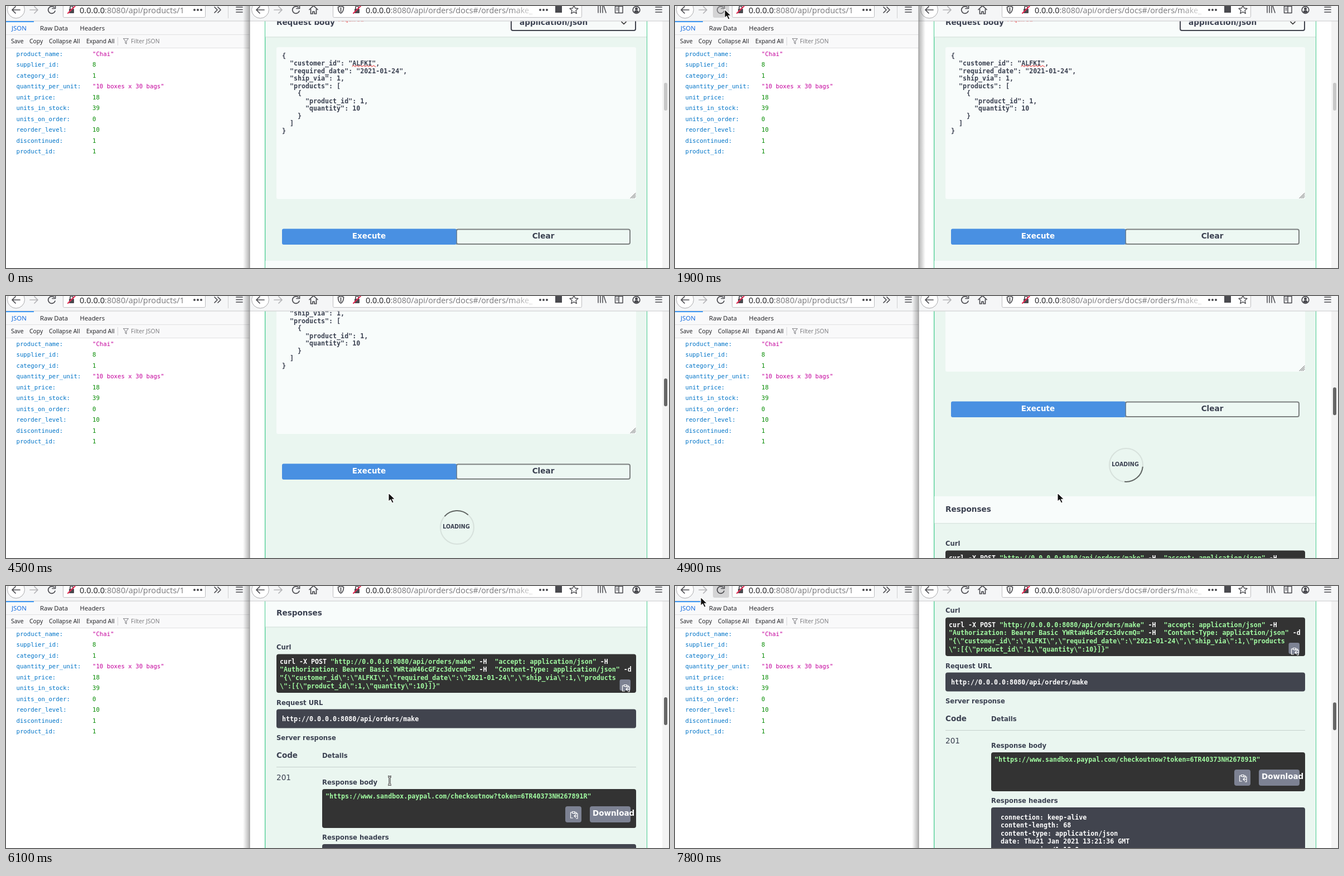
Write an HTML page that moves like this. It is 1189 px wide and 471 px high and loops after 8000 ms.

```html
<!DOCTYPE html>
<html lang="en">
<head>
<meta charset="utf-8">
<title>Order API demo</title>
<style>
html, body { margin: 0; width: 100%; height: 100%; overflow: hidden; background: #fff; }
svg { display: block; width: 1189px; height: 471px; }
text { white-space: pre; }
.ui { font-family: "Open Sans", "Noto Sans", sans-serif; fill: #1a1a1e; }
.page { font-family: "DejaVu Sans", sans-serif; font-weight: bold; fill: #3b4151; }
.mono { font-family: "DejaVu Sans Mono", monospace; }
.line { fill: none; stroke: #4a4a4f; stroke-width: 1.7; stroke-linecap: round; stroke-linejoin: round; }
</style>
</head>
<body>
<svg id="stage" viewBox="0 0 1189 471"></svg>
<script>
const LOOP = 8000, STEP = 100;
const GREEN = "#a2fca2", SLATE = "#41444e", MINT = "#eaf6f0", PALE = "#f8fcfb";

const esc = s => String(s).replace(/&/g, "&amp;").replace(/</g, "&lt;");
const rect = (x, y, w, h, fill, more = "") =>
  `<rect x="${x}" y="${y}" width="${w}" height="${h}" fill="${fill}" ${more}/>`;
const text = (x, y, size, str, cls, more = "") =>
  `<text x="${x}" y="${y}" font-size="${size}" class="${cls}" ${more}>${esc(str)}</text>`;
const page = (x, y, size, str, more) => text(x, y, size, str, "page", more);
const code = (x, y, str, fill, size = 11.65) =>
  text(x, y, size, str, "mono", `fill="${fill}" font-weight="bold"`);
const line = (d, more = "") => `<path class="line" d="${d}" ${more}/>`;
const group = (id, body, more = "") => `<g id="${id}" ${more}>${body}</g>`;

// Strings inside double quotes are green, the rest is white.
function curlLine(x, y, parts) {
  const spans = parts.map((p, i) => `<tspan fill="${i % 2 ? GREEN : "#fff"}">${esc(p)}</tspan>`);
  return `<text x="${x}" y="${y}" font-size="11.65" font-weight="bold" class="mono">${spans.join("")}</text>`;
}

const dots = x => [0, 6, 12].map(d => `<circle cx="${x + d}" cy="7" r="2" fill="#4a4a4f"/>`).join("");
const menu = x => line(`M${x} 2h11m-11 4.5h11m-11 4.5h11`, 'stroke-linecap="butt"');
const reload = (x, id) =>
  line(`M${x + 4} 2.2A6.3 6.3 0 1 0 ${x + 6} 9M${x + 6.5} -1V4.5H${x + 1}`, `id="${id}"`);
const lock = x => rect(x - 4, 5, 9, 8, "#4a4a4f", 'rx="1"') +
  line(`M${x - 2} 5V2a2.6 2.6 0 0 1 5 0V5`) +
  line(`M${x - 6} 13L${x + 7} 0`, 'style="stroke:#e22850;stroke-width:2"');
const clipboard = (x, y) =>
  line(`M${x - 3} ${y - 4}h-2.5v10h4m4-10h2.5v3M${x - 2.5} ${y - 5.5}h4.5v3h-4.5zM${x + 7} ${y + 2.5}h-6m2.5-2.5l-2.5 2.5l2.5 2.5m1 2h2.500v-9h-7`,
    'style="stroke:#fff;stroke-width:1.2"');

function navigation(x, id) {
  return `<circle cx="${x + 18}" cy="6.500" r="15.500" fill="#fff" stroke="#a9a9ac"/>` +
    line(`M${x + 25} 7H${x + 11}m6 -6l-6 6l6 6`) +
    line(`M${x + 43} 7h14m-6 -6l6 6l-6 6`, 'style="stroke:#b4b4b7"') +
    group(id + "Hover", rect(x + 68, -6, 29, 27, "#d4d4d5", 'rx="3"'), 'opacity="0"') +
    reload(x + 82, id + "Reload");
}
const address = (x, path, size) =>
  `<text x="${x}" y="12.500" font-size="${size}" class="ui">0.0.0.0<tspan fill="#77777a">:8080${path}</tspan></text>`;

function leftWindow() {
  const rows = [["product_name", '"Chai"'], ["supplier_id", 8], ["category_id", 1],
    ["quantity_per_unit", '"10 boxes x 30 bags"'], ["unit_price", 18], ["units_in_stock", 39],
    ["units_on_order", 0], ["reorder_level", 10], ["discontinued", 1], ["product_id", 1]];
  const tree = rows.map(([key, value], i) => {
    const y = 90 + i * 19.45;
    return text(18.500, y, 10.7, key + ":", "mono", 'fill="#0074c8"') +
      text(155, y, 10.7, value, "mono", `fill="${typeof value === "string" ? "#c4009c" : "#058b00"}"`);
  }).join("");
  const tabs = [[10, "JSON", "#0060df"], [61, "Raw Data"], [132.500, "Headers"]]
    .map(([x, s, c]) => text(x, 44, 11.4, s, "ui", c ? `style="fill:${c}"` : "")).join("");
  const tools = [[9, "Save"], [42, "Copy"], [77, "Collapse All"], [144, "Expand All"]]
    .map(([x, s]) => text(x, 67, 10.4, s, "ui")).join("");
  return rect(0, 0, 437, 471, "#fff") + rect(0, 0, 437, 27, "#f5f6f7") +
    navigation(0, "left") +
    rect(102.500, -10, 255, 30.500, "#fff", 'rx="2" stroke="#bcbcbf"') + lock(117) +
    address(132, "/api/products/1", 14.6) + dots(338) +
    line("M374 2l5 5l-5 5m6 -10l5 5l-5 5") + rect(398, 0, 1, 22, "#d0d0d2") + menu(413) +
    group("viewer", rect(0, 27, 437, 48, "#f9f9fa") + rect(0, 27, 50, 2, "#0a84ff") +
      rect(0, 51, 437, 1, "#e0e0e2") + rect(0, 75, 437, 1, "#e0e0e2") + tabs + tools +
      rect(200, 56, 1, 15, "#d7d7db") +
      line("M210.500 58.500h9l-3.500 4.500v5l-2-1.500v-3.500z", 'style="stroke:#8a8a8e;stroke-width:1.1"') +
      text(224, 67, 10.4, "Filter JSON", "ui", 'style="fill:#77777a"') + tree) +
    rect(0, 26.500, 437, 1, "#c9c9cc");
}

function requestPart() {
  const body = ["{", '  "customer_id": "ALFKI",', '  "required_date": "2021-01-24",', '  "ship_via": 1,',
    '  "products": [', "    {", '      "product_id": 1,', '      "quantity": 10', "    }", "  ]", "}"];
  let wave = "M621 109";
  for (let i = 0; i < 14; i++) wave += `l1.5 ${i % 2 ? 2 : -2}l1.500 0`;
  return rect(465, 0, 684, 55, PALE) + rect(465, 55, 684, 1.500, "#dce7e2") +
    page(485, 34, 13.55, "Request body") +
    page(596, 28, 9.6, "required", 'style="fill:#f46a6a;font-style:italic"') +
    rect(906, 13, 223, 31, "#f7faf9", `rx="3" stroke="${SLATE}" stroke-width="2"`) +
    page(921, 34, 13.6, "application/json") + line("M1104 28.500l4 4l4-4", 'style="stroke:#333"') +
    rect(485, 74, 645, 273, PALE, 'rx="3"') +
    body.map((s, i) => code(495, 94 + i * 13.45, s, "#3b4151")).join("") +
    line(wave, 'style="stroke:#e33;stroke-width:1"') +
    line("M1120 345.500l9-9m-6 9l6-6m-3 6l3-3", 'style="stroke:#555;stroke-width:1"') +
    rect(495, 400.500, 313, 28.500, "#000", 'id="glow" rx="4" opacity=".5" filter="url(#blur)"') +
    rect(808, 401.500, 311, 26.500, "#edf8f3", 'rx="3" stroke="#7c8080" stroke-width="2"') +
    rect(495, 400.500, 313, 28.500, "#4990e2", 'rx="3"') + rect(807.500, 401, 1.500, 28, "#6b7f92") +
    page(651, 418, 13.5, "Execute", 'text-anchor="middle" style="fill:#fff"') +
    page(963.500, 418, 13.6, "Clear", 'text-anchor="middle"') +
    group("loading", `<circle cx="809" cy="515" r="30" fill="none" stroke="#555" stroke-opacity=".13" stroke-width="2"/>` +
      `<path id="spinner" d="M787.8 493.8A30 30 0 0 1 830.2 493.8" fill="none" stroke="#000" stroke-opacity=".55" stroke-width="2"/>` +
      page(807.500, 516.500, 9.6, "LOADING", 'text-anchor="middle"'));
}

function responsePart() {
  const raw = String.raw;
  const curl = [
    ["curl -X POST ", '"http://0.0.0.0:8080/api/orders/make"', " -H  ", '"accept: application/json"', " -H"],
    ["", '"Authorization: Bearer Basic YWRtaW46cGFzc3dvcmQ="', " -H  ", '"Content-Type: application/json"', " -d"],
    ["", raw`"{\"customer_id\":\"ALFKI\",\"required_date\":\"2021-01-24\",\"ship_via\":1,\"products`],
    ["", raw`\":[{\"product_id\":1,\"quantity\":10}]}"`]];
  const headers = ["connection: keep-alive", "content-length: 68", "content-type: application/json",
    "date: Thu21 Jan 2021 13:21:36 GMT", "server: nginx/1.18.0"];
  return rect(465, 222, 684, 48, PALE) + rect(465, 270, 684, 1.500, "#dce7e2") +
    page(485, 250, 13.6, "Responses") + page(485, 311, 11.6, "Curl") +
    rect(485, 319.500, 645, 69.500, "#333", 'rx="4"') +
    curl.map((parts, i) => curlLine(491, 336.500 + i * 14.7, parts)).join("") +
    rect(1100.500, 365, 19.500, 20, "#7d8293", 'rx="3"') + clipboard(1111, 380) +
    page(485, 410.500, 11.6, "Request URL") + rect(485, 418.500, 645, 34, SLATE, 'rx="4"') +
    code(495, 440, "http://0.0.0.0:8080/api/orders/make", "#fff") +
    page(485, 474, 11.6, "Server response") + page(485, 506, 13.5, "Code") + page(567, 506, 11.6, "Details") +
    rect(485, 522, 645, 1, "#c5d0cc") + page(485, 545.500, 13.6, "201", 'style="font-weight:normal"') +
    page(567, 553.500, 11.6, "Response body") + rect(567, 562, 563, 70, "#333", 'rx="4"') +
    code(573, 579, '"https://www.sandbox.paypal.com/checkoutnow?token=6TR40373NH267891R"', GREEN) +
    rect(1003, 593, 29, 29, "#7d8293", 'rx="4"') + clipboard(1018, 608) +
    rect(1047, 593, 73, 29, "#7d8293", 'rx="4"') +
    page(1052, 610, 13.5, "Download", 'style="fill:#fff"') +
    page(567, 653, 11.6, "Response headers") + rect(567, 661, 563, 110, SLATE, 'rx="4"') +
    headers.map((s, i) => code(584, 682.500 + i * 14.6, s, "#fff")).join("");
}

function rightWindow() {
  return rect(437, 0, 752, 471, "#fff") + rect(437, 0, 752, 27, "#f5f6f7") +
    `<g clip-path="url(#view)">` + rect(464, 27, 686, 444, "#49cc90") + rect(465.300, 27, 683.700, 444, MINT) +
    group("request", requestPart()) + group("response", responsePart()) +
    rect(1177, 27, 12, 444, "#f3f3f3") + rect(1180, 0, 6, 50, "#c8c8c8", 'id="thumb" rx="3"') + "</g>" +
    navigation(438, "right") + line("M544 6.500l7.500-7l7.500 7M546.500 6v8h3.500v-4h3v4h3.500v-8") +
    rect(586.500, -10, 446, 30.500, "#fff", 'rx="2" stroke="#bcbcbf"') +
    line("M600.500 0l5 2c0 6-1 9-5 11c-4-2-5-5-5-11zM600.500 3v7") + lock(629) +
    address(645, "/api/orders/docs#/orders/make_", 14.4) + rect(905, -1, 45, 20, "url(#fade)") + dots(958) +
    rect(985, 0, 12, 12, "#4a4a4f") +
    line("M1018.500 -1l2.300 5l5.200.5l-4 3.600l1.200 5.400l-4.700-2.800l-4.700 2.800l1.200-5.400l-4-3.600l5.200-.5z", 'style="stroke-width:1.4"') +
    line("M1062 0v12m4-12v12m4-12v12m2-12l4 12", 'style="stroke-width:1.5"') +
    line("M1092.500 0.500h13.500v12h-13.500zM1099 1v11m-4-8h2m-2 3h2", 'style="stroke-width:1.5"') +
    `<circle cx="1130.500" cy="7" r="6.300" class="line"/><circle cx="1130.500" cy="5" r="2.500" fill="#4a4a4f"/>` +
    `<path d="M1126.500 11a4 3.500 0 0 1 8 0a6 6 0 0 1-8 0z" fill="#4a4a4f"/>` +
    menu(1165) + rect(437, 26.500, 752, 1, "#c9c9cc");
}

const gradient = (id, color, from, to) => `<linearGradient id="${id}">` +
  `<stop stop-color="${color}" stop-opacity="${from}"/><stop offset="1" stop-color="${color}" stop-opacity="${to}"/></linearGradient>`;
const outline = 'stroke-width="1.1" stroke-linejoin="round"';
const cursors =
  group("arrow", `<path d="M0 0V15.500L3.700 12.200L6.500 18.300L9.300 17L6.600 11.200H11.500Z" fill="#111" stroke="#fff" ${outline}/>`) +
  group("hand", `<path d="M-2 1.500q0-2 1.500-2t1.500 2V6q2-1.500 3 .5q2-1 3 .8q2-.3 2.500 1.500V12q-.5 3-2 4H-.5Q-2 13-5 10q-1-2 1-2l2 1.500z" fill="#fff" stroke="#111" ${outline}/>`) +
  group("beam", `<path d="M-3-7.500Q0-7.500 0-5.500Q0-7.500 3-7.500M0-5.500V5.500M-3 7.500Q0 7.500 0 5.500Q0 7.500 3 7.500" fill="none" stroke="#111" stroke-width="3"/>` +
    `<path d="M-3-7.500Q0-7.500 0-5.500Q0-7.500 3-7.500M0-5.500V5.500M-3 7.500Q0 7.500 0 5.500Q0 7.500 3 7.500" fill="none" stroke="#fff" stroke-width="1.2"/>`);

document.getElementById("stage").innerHTML =
  `<defs><clipPath id="view"><rect x="437" y="27" width="752" height="444"/></clipPath>` +
  `<filter id="blur" x="-5%" y="-50%" width="110%" height="200%"><feGaussianBlur stdDeviation="2.500"/></filter>` +
  gradient("fade", "#fff", 0, 0.9) + gradient("shadeLeft", "#000", 0, 0.3) + gradient("shadeRight", "#000", 0.3, 0) +
  "</defs>" + leftWindow() + rightWindow() +
  rect(425, 0, 12, 471, "url(#shadeLeft)", 'id="rightFront"') +
  rect(437, 0, 12, 471, "url(#shadeRight)", 'id="leftFront"') + rect(436.500, 0, 1, 471, "#8f8f8f") +
  group("cursor", cursors);

const el = {};
document.querySelectorAll("[id]").forEach(node => el[node.id] = node);
const show = (node, on) => node.setAttribute("visibility", on ? "visible" : "hidden");
const move = (node, x, y) => node.setAttribute("transform", `translate(${x} ${y})`);
const clamp = u => Math.max(0, Math.min(1, u));
const easeOut = (t, start, span, power) => 1 - (1 - clamp((t - start) / span)) ** power;

// Pointer stops: time, x, y
const path = [[500, 89, -12], [800, 89, 4], [900, 89, 6], [2100, 89, 6], [2300, 166, 31], [2400, 166, 31],
  [2900, 640, 371], [3000, 640, 371], [3500, 641, 399], [4000, 641, 399], [4300, 686, 354], [5400, 686, 354],
  [5500, 688, 350], [6500, 688, 350], [6600, 687, 341], [6900, 687, 341], [7600, 83, 60], [7700, 83, 60], [7800, 46, 20]];

function pointer(t) {
  const i = path.findIndex(stop => stop[0] > t);
  if (i < 0) return path[path.length - 1].slice(1);
  if (i === 0) return path[0].slice(1);
  const [t0, x0, y0] = path[i - 1], [t1, x1, y1] = path[i];
  const u = (t - t0) / (t1 - t0);
  return [x0 + (x1 - x0) * u, y0 + (y1 - y0) * u];
}

function draw(t) {
  const loading = t >= 4000 && t < 5500;
  const scroll = Math.round(236 * easeOut(t, 4300, 1000, 2.45) + 263 * easeOut(t, 5900, 400, 2));
  const leftFront = t >= 1500 && t < 3200;

  show(el.viewer, t < 1700 || t >= 1900);
  show(el.leftFront, leftFront);
  show(el.rightFront, !leftFront);
  el.leftHover.setAttribute("opacity", t >= 7800 ? 1 : t < 2200 ? clamp((t - 500) / 400) : 0);
  el.leftReload.style.stroke = t >= 1500 && t < 2200 ? "#77777a" : "";

  move(el.request, 0, -scroll);
  move(el.response, 0, 236 - scroll + (loading ? 113 : 0));
  show(el.loading, loading);
  el.spinner.setAttribute("transform", `rotate(${(t - 4510) * 0.36} 809 515)`);
  show(el.glow, t >= 3300 && t < 4200);
  el.thumb.setAttribute("y", (loading ? 134 : 138) + 0.143 * scroll);
  el.thumb.setAttribute("fill", t < 3200 ? "#c8c8c8" : "#666");

  const kind = t >= 3300 && t < 4200 ? "hand" : t >= 5500 && t < 6600 ? "beam" : "arrow";
  for (const name of ["arrow", "hand", "beam"]) show(el[name], t >= 600 && name === kind);
  move(el.cursor, ...pointer(t));
}

const start = performance.now();
function tick() {
  const t = (performance.now() - start) % LOOP;
  draw(Math.floor(t / STEP) * STEP);
  requestAnimationFrame(tick);
}
tick();
</script>
</body>
</html>
```
